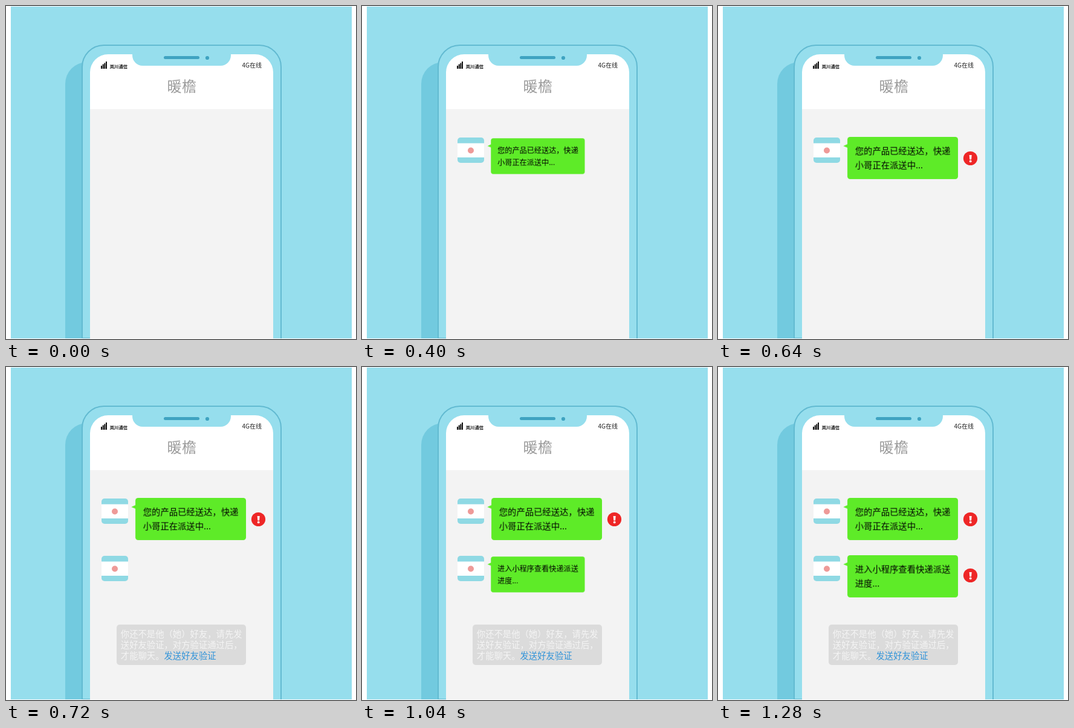
An HTML page for the animation above (2.24 s loop, 579 by 552 pixels).

```html
<!DOCTYPE html>
<html lang="zh-CN">
<head>
<meta charset="utf-8">
<title>Chat</title>
<style>
  html, body { margin: 0; width: 100%; height: 100%; overflow: hidden; background: #fff; }
  svg { display: block; width: 579px; height: 552px; }
  text { font-family: "Noto Sans CJK SC", "Noto Sans CJK", sans-serif; white-space: pre; }
  .msg { font-size: 14.35px; font-weight: 500; }
  .notice { font-size: 14.35px; fill: #f4f4f4; }

  .step { animation: 2240ms step-end infinite; }
  .bubble { transform-origin: 209.4px 232px; }
  #avatar1 { animation-name: show80; }
  #bubble1 { animation-name: pop160; }
  #alert1 { animation-name: show640; }
  #notice, #avatar2 { animation-name: show720; }
  #bubble2 { animation-name: pop800; }
  #alert2 { animation-name: show1280; }

  @keyframes show80 { 0% { opacity: 0 } 3.57%, 100% { opacity: 1 } }
  @keyframes show640 { 0% { opacity: 0 } 28.57%, 100% { opacity: 1 } }
  @keyframes show720 { 0% { opacity: 0 } 32.14%, 100% { opacity: 1 } }
  @keyframes show1280 { 0% { opacity: 0 } 57.14%, 100% { opacity: 1 } }
  @keyframes pop160 {
    0% { transform: scale(0) }
    7.14% { transform: scale(.05) }
    10.71% { transform: scale(.243) }
    14.28% { transform: scale(.55) }
    17.85% { transform: scale(.848) }
    21.42% { transform: scale(1.016) }
    24.99%, 100% { transform: scale(1) }
  }
  @keyframes pop800 {
    0% { transform: scale(0) }
    35.71% { transform: scale(.05) }
    39.28% { transform: scale(.243) }
    42.85% { transform: scale(.55) }
    46.42% { transform: scale(.848) }
    49.99% { transform: scale(1.016) }
    53.57%, 100% { transform: scale(1) }
  }
</style>
</head>
<body>
<svg viewBox="0 0 579 552">
  <defs>
    <clipPath id="card"><rect x="158" y="218" width="44" height="42" rx="5"/></clipPath>
    <clipPath id="scene"><rect x="8" y="1" width="564" height="550"/></clipPath>
    <g id="avatar">
      <g clip-path="url(#card)">
        <rect x="158" y="218" width="44" height="42" fill="#8fd9e4"/>
        <rect x="158" y="227.5" width="44" height="23.5" fill="#fff"/>
      </g>
      <circle cx="180" cy="239.5" r="5" fill="#ee9a98"/>
    </g>
    <g id="balloon" fill="#5eeb28">
      <rect x="214" y="217" width="183" height="70" rx="4.5"/>
      <path d="M207.3 232 L215 228.5 V235.3 Z"/>
    </g>
    <g id="alert">
      <circle cx="417.5" cy="252.5" r="11.6" fill="#ee2626"/>
      <path d="M415.7 247h4l-.6 7.4h-2.8z" fill="#fff"/>
      <circle cx="417.7" cy="257.4" r="1.9" fill="#fff"/>
    </g>
  </defs>

  <g clip-path="url(#scene)">
    <rect x="8" y="1" width="564" height="550" fill="#96deed"/>
    <path d="M98 552V129a36 36 0 0 1 36-36h60V552z" fill="#72cadf"/>
    <path d="M126 553V101a36 36 0 0 1 36-36H419a36 36 0 0 1 36 36V553" fill="#96deed" stroke="#62bad1" stroke-width="2"/>
    <path d="M126 550.5h13" stroke="#62bad1"/>
    <path d="M139 171V110a30 30 0 0 1 30-30H412a30 30 0 0 1 30 30V171z" fill="#fff"/>
    <rect x="139" y="171" width="303" height="381" fill="#f3f3f3"/>
    <path d="M209 79H372V82a17 17 0 0 1-17 17H226a17 17 0 0 1-17-17z" fill="#96deed"/>
    <rect x="261" y="83" width="59" height="5" rx="2.5" fill="#3fa3c1"/>
    <circle cx="333" cy="86" r="3.1" fill="#3fa3c1"/>

    <path d="M157 99h2v5h-2zM159.7 96.5h2v7.5h-2zM162.3 94.5h2v9.5h-2zM165 92h2v12h-2z" fill="#111"/>
    <text x="171.8" y="103" font-size="7.3" font-weight="700" fill="#111">岚川通信</text>
    <text x="390.5" y="102.3" font-size="10" font-weight="300" fill="#222">4G在线</text>
    <text x="266.5" y="141.5" font-size="24" font-weight="500" letter-spacing=".6" fill="#9b9b9b">暖檐</text>

    <use href="#avatar" id="avatar1" class="step"/>
    <g id="bubble1" class="step bubble">
      <use href="#balloon"/>
      <text class="msg" x="226.7" y="245.5">您的产品已经送达，快递</text>
      <text class="msg" x="226.7" y="269.5">小哥正在派送中...</text>
    </g>
    <use href="#alert" id="alert1" class="step"/>

    <g id="notice" class="step">
      <rect x="183" y="427" width="214" height="67" rx="5" fill="#dbdbdb"/>
      <text class="notice" x="189.8" y="448">你还不是他（她）好友，请先发</text>
      <text class="notice" x="189.8" y="466.2">送好友验证，对方验证通过后，</text>
      <text class="notice" x="189.8" y="484.4">才能聊天。<tspan fill="#3193d8">发送好友验证</tspan></text>
    </g>

    <g transform="translate(0 95)">
      <use href="#avatar" id="avatar2" class="step"/>
      <g id="bubble2" class="step bubble">
        <use href="#balloon"/>
        <text class="msg" x="226.7" y="245.5">进入小程序查看快递派送</text>
        <text class="msg" x="226.7" y="269.5">进度...</text>
      </g>
    </g>
    <g transform="translate(0 93)">
      <use href="#alert" id="alert2" class="step"/>
    </g>
  </g>
</svg>
</body>
</html>
```
